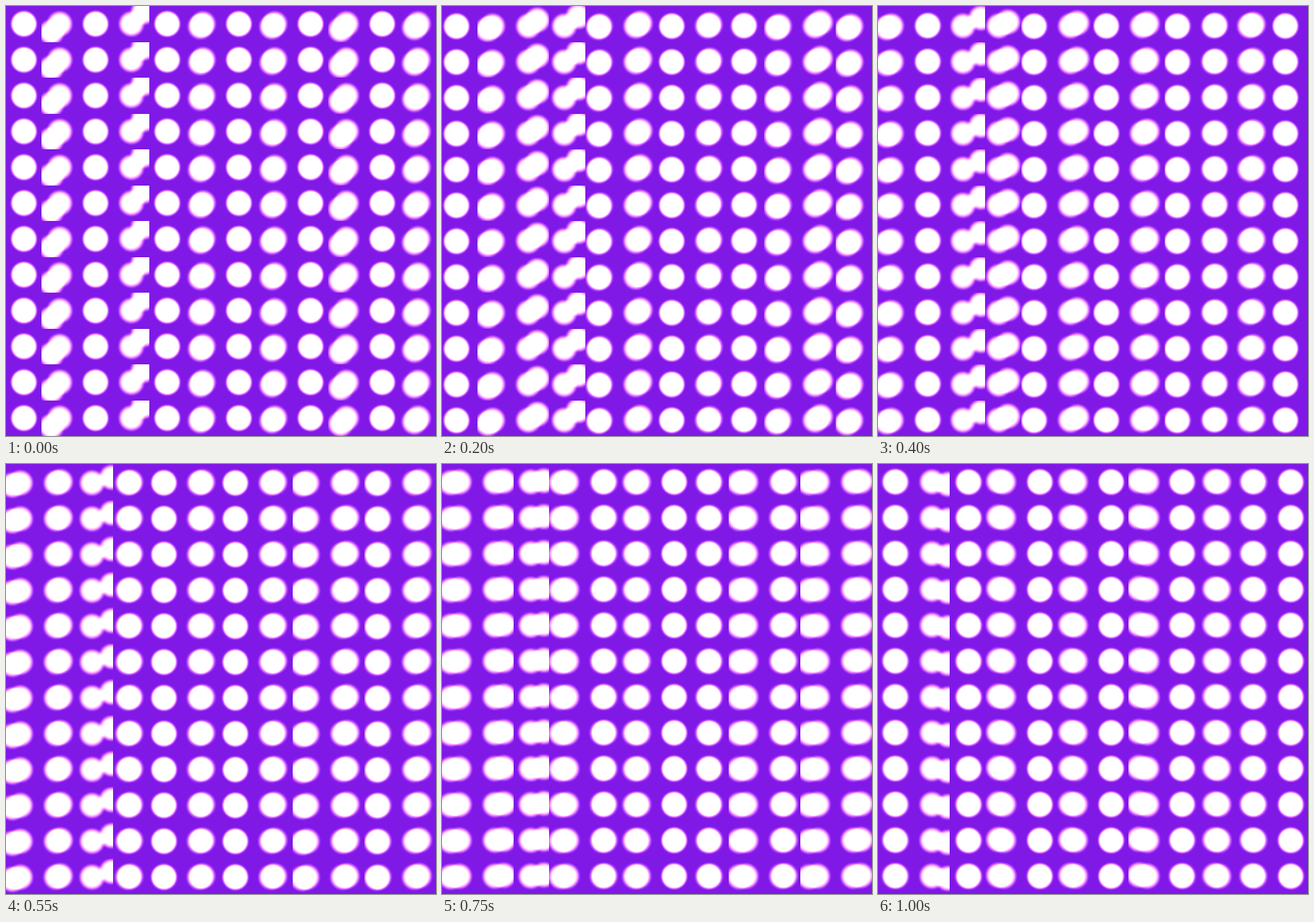
An HTML page with a canvas for the animation above (1.05 s loop, 510x510 px).

```html
<!DOCTYPE html>
<html lang="en">
<head>
<meta charset="utf-8">
<title>Merging dots</title>
<style>
  html, body { margin: 0; width: 100%; height: 100%; overflow: hidden; background: #8018e6; }
  canvas { display: block; }
</style>
</head>
<body>
<canvas id="stage" width="510" height="510"></canvas>
<script>
const ctx = document.getElementById('stage').getContext('2d');
const COUNT = 12, CELL = 42.5, SIZE = COUNT * CELL;
const LOOP = 1050, STEP = 50;
const INNER = 9, OUTER = 17;
const ANCHOR = COUNT / 2;

// Slopes of the gradient noise at its lattice points, two columns apart
const slopes = [-21, 35, -45, -27, -8, 31, 56, 60];

function noise(u) {
  const i = Math.floor(u), f = u - i;
  const fade = f * f * f * (f * (6 * f - 15) + 10);
  return slopes[i] * f * (1 - fade) + slopes[i + 1] * (f - 1) * fade;
}

function glow(x, y) {
  const g = ctx.createRadialGradient(x, y, INNER, x, y, OUTER);
  for (let k = 0; k <= 10; k++) {
    const u = k / 10;
    g.addColorStop(u, `rgba(255,255,255,${1 - u * u * (3 - 2 * u)})`);
  }
  return g;
}

function draw(t) {
  ctx.globalCompositeOperation = 'source-over';
  ctx.fillStyle = '#8018e6';
  ctx.fillRect(0, 0, SIZE, SIZE);
  ctx.globalCompositeOperation = 'lighter';

  // The wave drifts left one lattice step per loop while its axis turns
  const drift = t / LOOP;
  const angle = -Math.PI / 4 + 0.925 * t / 1000;
  const dx = Math.cos(angle), dy = Math.sin(angle);
  const shift = col => noise(col / 2 + drift);

  for (let c = 0; c < COUNT; c++) {
    const left = Math.floor(c * CELL), right = Math.floor((c + 1) * CELL);
    for (let r = 0; r < COUNT; r++) {
      const top = Math.ceil(r * CELL), bottom = Math.ceil((r + 1) * CELL);
      for (const d of [shift(ANCHOR), shift(c)]) {
        ctx.fillStyle = glow((c + 0.5) * CELL + d * dx, (r + 0.5) * CELL + d * dy);
        ctx.fillRect(left, top, right - left, bottom - top);
      }
    }
  }
}

const start = performance.now();
let shown = -1;
function tick() {
  const t = Math.floor((performance.now() - start) % LOOP / STEP) * STEP;
  if (t !== shown) draw(shown = t);
  requestAnimationFrame(tick);
}
tick();
</script>
</body>
</html>
```
